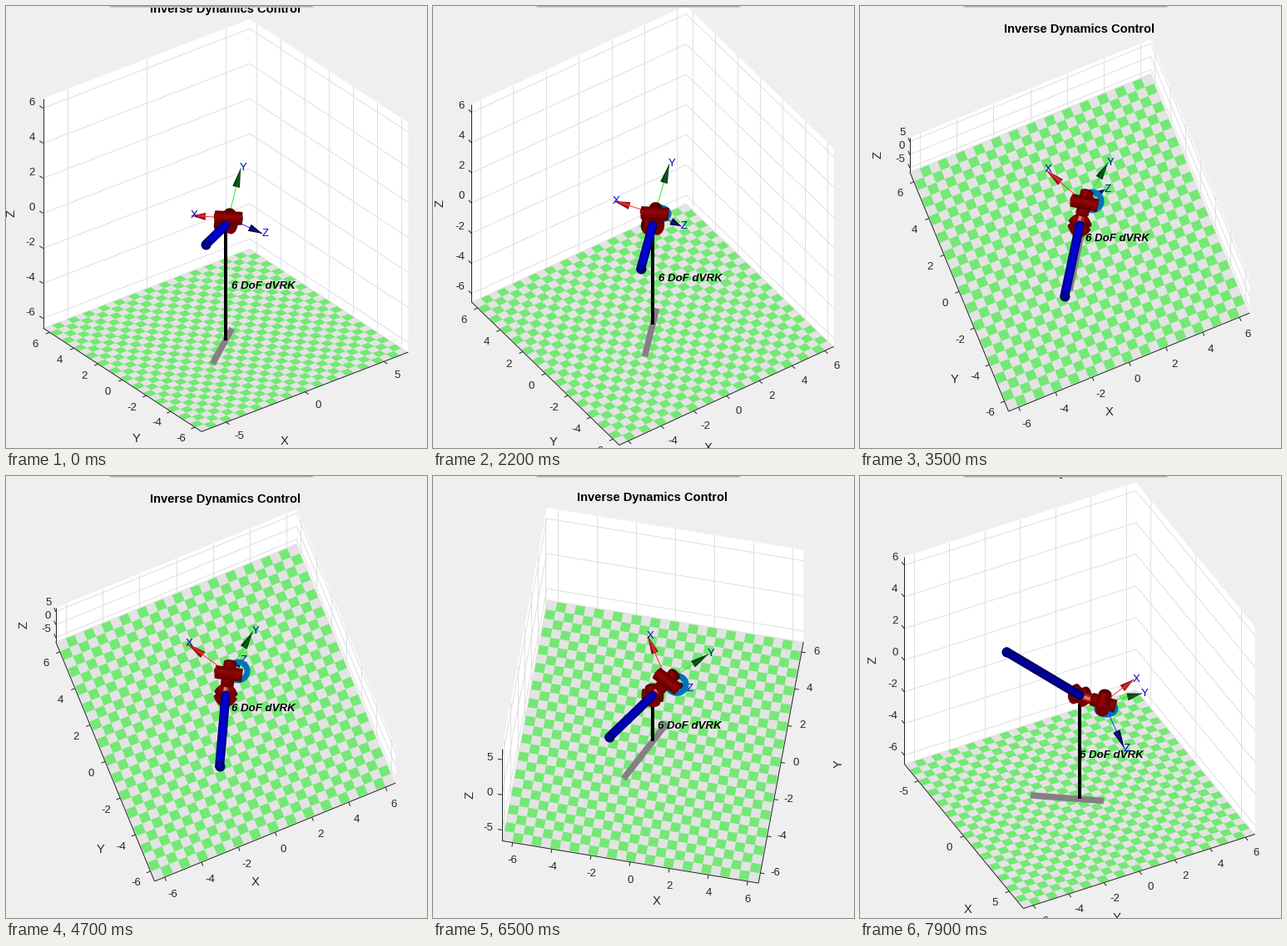
Write a matplotlib script that moves like this. It is 506x530 px and loops after 8 s.

```python
import numpy as np
import matplotlib.pyplot as plt
from matplotlib.animation import FuncAnimation
from matplotlib.collections import LineCollection, PolyCollection

W, H, DPI = 506, 530, 72
FRAMES, STEP = 80, 100
CX, CY, S = 264, 263, 23.9      # screen centre and pixels per unit
L = 6.55                        # half size of the axes box
FLOOR, TILES = 6.5, 27          # half size of the floor, tiles per side
ARM, ARROW = 3.7, 2.6           # reach of the tool, length of frame arrows

plt.rcParams["font.family"] = "Liberation Sans"
INK = "#262626"
UP = np.array([0, 0, 1.0])

# camera drags: time, azimuth, elevation
VIEW = np.array([(2000, -37.5, 30), (2700, -27.2, 71),
                 (3050, -22.3, 82.6), (5700, -22.3, 82.6),
                 (6200, -10.5, 73.5), (7000, 44, 63.3), (7200, 62.8, 38.5)])


def unit(v):
    v = np.asarray(v, float)
    return v / np.linalg.norm(v)


def mix(a, b, k):
    return (1 - k) * np.array(a) + k * np.array(b)


def camera(t):
    """Azimuth in degrees and rows (right, up, towards viewer)."""
    az, el = (np.interp(t, VIEW[:, 0], VIEW[:, k]) for k in (1, 2))
    a, e = np.radians([az, el])
    ca, sa, ce, se = np.cos(a), np.sin(a), np.cos(e), np.sin(e)
    return az, np.array([(ca, sa, 0),
                         (-se * sa, se * ca, 1.015 * ce),
                         (ce * sa, -ce * ca, se)])


def pose(t):
    """Tool tip, wrist and wrist frame of the slowly swinging arm."""
    s = np.sin(np.pi * t / 11400) ** 2
    a = np.radians(53 - 28 * s)
    lift = min(0.3 + 0.65 * (t / 2500 - 1) ** 2, 2.4)
    tip = np.array([-ARM * np.sin(a), -ARM * np.cos(a), lift])
    hub = np.array([0.55 + 0.4 * (1 - s), 1.0, -0.35])
    vx = unit(mix((-0.18, 0.9, -0.3), (-0.57, 0.87, 0.05), s))
    vy = unit(mix((0.59, 0.37, 0.75), (0.70, 0.52, 0.40), s))
    return tip, hub, vx, vy, np.cross(vx, vy)


def green_tiles():
    e = np.linspace(-FLOOR, FLOOR, TILES + 1)
    return np.array([[(e[i], e[j], -L), (e[i + 1], e[j], -L),
                      (e[i + 1], e[j + 1], -L), (e[i], e[j + 1], -L)]
                     for i in range(TILES) for j in range(TILES) if (i + j) % 2])


GREEN = green_tiles()

fig = plt.figure(figsize=(W / DPI, H / DPI), dpi=DPI, facecolor="#efefef")
ax = fig.add_axes([0, 0, 1, 1])


class Scene:
    def __init__(self, t):
        self.az, self.m = camera(t)
        self.z = 0

    def proj(self, p):
        q = np.asarray(p, float) @ self.m.T
        return np.stack([CX + S * q[..., 0], CY - S * q[..., 1]], -1)

    def layer(self):
        self.z += 1
        return self.z

    def lines(self, segs, color, lw):
        ax.add_collection(LineCollection(segs, colors=color, linewidths=lw,
                                         zorder=self.layer()))

    def polys(self, polys, color):
        ax.add_collection(PolyCollection(polys, facecolors=color,
                                         edgecolors="none", zorder=self.layer()))

    def text(self, x, y, s, size=13.3, color=INK, **kw):
        opts = dict(ha="center", va="center") | kw
        ax.text(x, y, s, fontsize=size, color=color, zorder=self.layer(), **opts)

    def stroke(self, p, q, color, lw, shift=(0, 0), cap="butt"):
        a, b = self.proj([p, q]) + shift
        ax.plot([a[0], b[0]], [a[1], b[1]], color=color, lw=lw,
                solid_capstyle=cap, zorder=self.layer())

    def circle(self, c, n, r):
        u = unit(np.cross(n, (0.31, 0.87, 0.39)))
        a = np.linspace(0, 2 * np.pi, 41)[:, None]
        return self.proj(c + r * (np.cos(a) * u + np.sin(a) * np.cross(n, u)))

    def cylinder(self, c, n, half, r=0.33):
        """Shaded dark red drum with its two end discs."""
        if n @ self.m[2] < 0:
            n = -n
        a, b = c - n * half, c + n * half
        w = 2 * r * S
        self.polys([self.circle(a, n, r)], "#560000")
        self.stroke(a, b, "#600000", w)
        self.stroke(a, b, "#7c0000", w * 0.7, (-0.7, -0.7))
        self.stroke(a, b, "#900606", w * 0.3, (-1.5, -1.5))
        self.polys([self.circle(b, n, r)], "#740000")


def ticks(step):
    n = int(L // step)
    return [k * step for k in range(-n, n + 1)]


def axis_name(sc, seg, name, out):
    """Name below its axis; steep axes get it rotated at their side."""
    x, y = seg.mean(0)
    run, rise = np.abs(seg[1] - seg[0])
    slope = np.degrees(np.arctan2(rise, run))
    if slope > 75:
        sc.text(x + 69 * out, y + 2, name, 14.7, rotation=90)
    else:
        sc.text(x - out * (38 - 0.65 * slope), y + 38 + slope, name, 14.7)


def draw_box(sc):
    side = -1 if sc.az < 0 else 1       # x side carrying the y axis
    far = -side * L
    span = 2 * L * S * np.hypot(sc.m[0], sc.m[1])
    xt = ticks(2 if span[0] > 280 else 5)
    yt = ticks(2)
    zt = ticks(2 if span[2] > 200 else 5)

    walls = [[(-L, L, -L), (L, L, -L), (L, L, L), (-L, L, L)],
             [(far, -L, -L), (far, L, -L), (far, L, L), (far, -L, L)]]
    sc.polys(sc.proj(walls), "white")
    grid = [[(x, L, -L), (x, L, L)] for x in xt]
    grid += [[(far, y, -L), (far, y, L)] for y in yt]
    grid += [[(-L, L, z), (L, L, z)] for z in zt]
    grid += [[(far, -L, z), (far, L, z)] for z in zt]
    sc.lines(sc.proj(grid), "#dfdfdf", 1)

    floor = [[(-L, -L, -L), (L, -L, -L), (L, L, -L), (-L, L, -L)]]
    sc.polys(sc.proj(floor), "#e3e3e3")
    sc.polys(sc.proj(GREEN), "#74e874")

    axes = [[(-L, -L, -L), (L, -L, -L)],
            [(side * L, -L, -L), (side * L, L, -L)],
            [(-L, far, -L), (-L, far, L)]]
    zdir = (0, 1, 0) if side < 0 else (-1, 0, 0)
    marks = [("x", v, (v, -L, -L), (0, -1, 0)) for v in xt]
    marks += [("y", v, (side * L, v, -L), (side, 0, 0)) for v in yt]
    marks += [("z", v, (-L, far, v), zdir) for v in zt]
    segs = list(sc.proj(axes))
    for name, v, p, out in marks:
        a = sc.proj(p)
        nx, ny = n = unit(sc.proj(np.add(p, out)) - a)
        segs.append(np.array([a, a + 5 * n]))
        if name == "z":
            sc.text(a[0] - 2 - 9 * abs(nx), a[1] - 1 + 10 * min(ny, 0),
                    str(v), ha="right")
            continue
        ox = 0 if abs(nx) < 0.25 else np.sign(nx) * (5 + 13 * abs(nx))
        oy = 0 if ny < 0.25 else 10 + 12 * ny
        sc.text(a[0] + ox, a[1] + oy, str(v))
    sc.lines(segs, INK, 1)

    axis_name(sc, segs[0], "X", -side)
    axis_name(sc, segs[1], "Y", side)
    zx, zy = segs[2].mean(0)
    sc.text(zx - 38, zy, "Z", 14.7, rotation=90)

    corners = [(x, y, L) for x in (-L, L) for y in (-L, L)]
    top = sc.proj(corners)[:, 1].min()
    sc.text(CX, top - 11.5, "Inverse Dynamics Control", 14.6, "black", weight="bold")


def draw_arrow(sc, o, v, name, line, lit, dark):
    v = v * ARROW
    sc.stroke(o, o + v, line, 1)
    base, tip = sc.proj([o + 0.62 * v, o + v])
    d = tip - base
    side = np.array([-d[1], d[0]]) / max(np.hypot(*d), 1) * 4.5
    sc.polys([[base + side, tip, base - side]], dark)
    sc.polys([[base + side * 0.6, tip, base - side * 0.3]], lit)
    sc.text(tip[0] + 3, tip[1], name, color="#0000c8")


def draw_robot(sc, t):
    tip, hub, vx, vy, vz = pose(t)
    root = np.zeros(3)

    foot, flat = -L * UP, tip * (1, 1, 0)
    sc.stroke(foot + 0.67 * flat, foot - 0.33 * flat, "#857f85", 7.5)
    sc.stroke(foot, root, "black", 4)
    lx, ly = sc.proj((0.27, -0.14, -L / 2))
    sc.text(lx, ly + 5, "6 DoF dVRK", color="black", ha="left",
            weight="bold", style="italic")

    draw_arrow(sc, hub, vz, "Z", "#3030ff", "#101078", "#00004c")
    draw_arrow(sc, hub, vy, "Y", "#30e830", "#0a5a1a", "#003c0c")
    draw_arrow(sc, hub, vx, "X", "#ff3030", "#e02830", "#980c14")

    ring = sc.circle(np.array([1.07, 0.95, -0.45]), UP, 0.46)
    ax.plot(ring[:, 0], ring[:, 1], color="#0072bd", lw=7, zorder=sc.layer())

    along = unit(hub)
    across = unit(np.cross(along, UP))
    sc.cylinder(root, unit(across + along), 0.5)
    sc.cylinder(root, unit(across - along), 0.5)
    for color, lw, dx in (("#7c0000", 13, 0), ("#a82020", 8, -0.5), ("#e87870", 3.5, -1.5)):
        sc.stroke(root, hub, color, lw, (dx, 0))
    sc.cylinder(hub, along, 0.62)
    sc.cylinder(hub, across, 0.68)

    dim = lift_shade(tip[2])
    sc.stroke(root, tip, (0, 0, 0.5 * dim), 11, cap="round")
    sc.stroke(root, tip, (0, 0, 0.82 * dim), 7, cap="round")
    x, y = sc.proj(tip)
    ax.plot(x, y, "o", ms=12, mew=0, color="#00006c", zorder=sc.layer())
    ax.plot(x - 0.5, y - 1, "o", ms=7, mew=0, color="#00009c", zorder=sc.layer())


def lift_shade(z):
    """The tool gets darker as it lifts away from the light."""
    return np.interp(z, (1.7, 2.4), (1, 0.72))


def draw(i):
    ax.cla()
    ax.set(xlim=(0, W), ylim=(H, 0))
    ax.axis("off")
    sc = Scene(i * STEP)
    draw_box(sc)
    draw_robot(sc, i * STEP)
    # lower edge of the panel above
    sc.lines([[(124, 0), (370, 0)]], "#d2d2d2", 4)
    sc.lines([[(126, 0), (368, 0)]], "#9c9c9c", 1.6)
    return []


anim = FuncAnimation(fig, draw, frames=FRAMES, interval=STEP,
                     init_func=lambda: [], repeat=True, repeat_delay=0)
plt.show()
```
